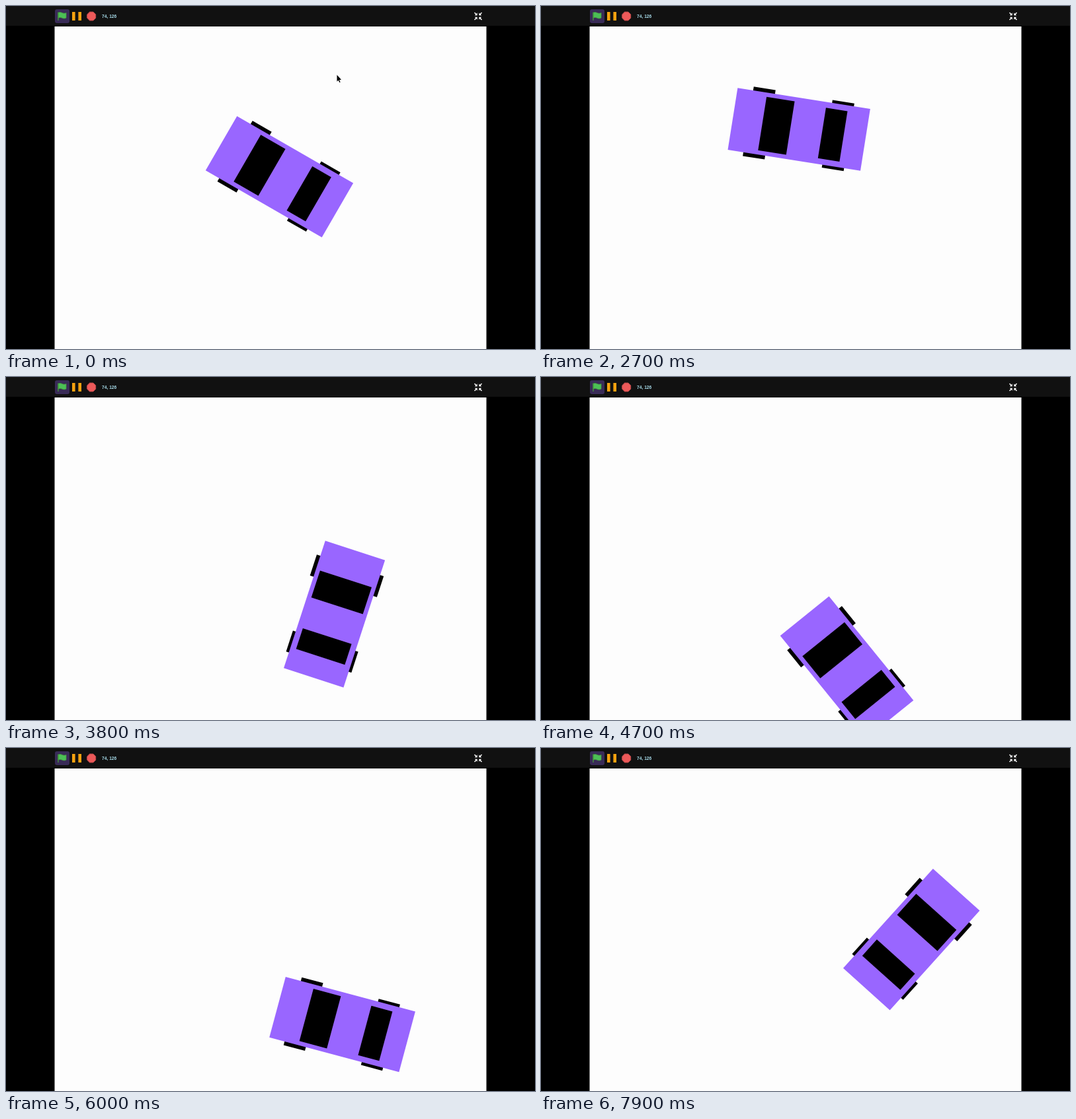
Write an HTML page with a canvas that moves like this. It is 800 px wide and 520 px high and loops after 8000 ms.

```html
<!DOCTYPE html>
<html lang="en">
<head>
<meta charset="utf-8">
<title>Driving car</title>
<style>
  html, body { margin: 0; width: 100%; height: 100%; overflow: hidden; background: #000; }
  canvas { display: block; width: 800px; height: 520px; }
</style>
</head>
<body>
<canvas id="view" width="800" height="520"></canvas>
<script>
const ctx = document.getElementById('view').getContext('2d');
const LOOP = 8000, STEP = 100;   // ms
const RAD = Math.PI / 180;
const STAGE = [73.5, 31, 653, 489];
const FORWARD = 1, REVERSE = -1;

// Where the steering or the gear changes.
const turns = [
  { at: 0, x: 413.5, y: 258.9, angle: 30, gear: FORWARD },
  { at: 4, x: 368, y: 216, angle: 51, gear: FORWARD },
  { at: 9, x: 291, y: 162.5, angle: 24, gear: FORWARD },
  { at: 22, x: 291, y: 162.5, angle: 24, gear: REVERSE },
  { at: 27, x: 390.2, y: 187, angle: 9, gear: REVERSE },
  { at: 38, x: 496.6, y: 359.5, angle: 108, gear: REVERSE },
  { at: 40.7, x: 483, y: 410, angle: 108, gear: REVERSE },
  { at: 44.5, x: 485, y: 488, angle: 73.5, gear: FORWARD },
  { at: 47, x: 462.5, y: 441.2, angle: 51, gear: FORWARD },
  { at: 52.4, x: 365, y: 391, angle: 9, gear: REVERSE },
  { at: 60, x: 508.6, y: 419.2, angle: 15, gear: FORWARD },
  { at: 64, x: 453, y: 404, angle: 15, gear: REVERSE },
  { at: 69.5, x: 540, y: 476, angle: 60, gear: FORWARD },
  { at: 79, x: 560.2, y: 290.2, angle: 132, gear: FORWARD }
];

// Cubic from p to q with end slopes m and n.
function hermite(p, q, m, n, u) {
  const v = 1 - u;
  return p * v * v * (1 + 2 * u) + q * u * u * (3 - 2 * u) + m * u * v * v - n * u * u * v;
}

// The car moves along its own axis, so its heading gives the slope of the path.
function poseAt(step) {
  const next = turns.findIndex(k => k.at > step);
  if (next < 0) return turns.at(-1);
  const a = turns[next - 1], b = turns[next];
  const u = (step - a.at) / (b.at - a.at);
  const bend = (b.angle - a.angle) * RAD;
  const pull = -a.gear * Math.hypot(b.x - a.x, b.y - a.y) / Math.cos(bend / 4) ** 2;
  const path = (axis, fn) =>
    hermite(a[axis], b[axis], pull * fn(a.angle * RAD), pull * fn(b.angle * RAD), u);
  return {
    x: path('x', Math.cos),
    y: path('y', Math.sin),
    angle: a.angle + (b.angle - a.angle) * u
  };
}

function poly(points, fill, stroke) {
  ctx.beginPath();
  points.forEach(([x, y]) => ctx.lineTo(x, y));
  ctx.closePath();
  ctx.fillStyle = fill;
  ctx.fill();
  if (stroke) {
    ctx.strokeStyle = stroke;
    ctx.lineWidth = 1;
    ctx.stroke();
  }
}

function box(x, y, w, h, fill) {
  ctx.fillStyle = fill;
  ctx.fillRect(x, y, w, h);
}

// A block across the car, centred on its long axis.
function block(x, length, width, fill) {
  box(x - length / 2, -width / 2, length, width, fill);
}

function drawCar({ x, y, angle }) {
  ctx.save();
  ctx.translate(x, y);
  ctx.rotate(angle * RAD);
  block(-61, 33.4, 106.4, '#000');
  block(59.8, 33.4, 103.8, '#000');
  block(0, 203, 95, '#9966ff');
  block(-34.7, 43, 82, '#000');
  block(51.6, 33, 77.5, '#000');
  ctx.restore();
}

function drawFlag() {
  ctx.beginPath();
  ctx.roundRect(74, 5, 22, 21, 3);
  ctx.fillStyle = '#392b57';
  ctx.fill();
  ctx.beginPath();
  ctx.moveTo(79, 10.2);
  ctx.bezierCurveTo(83, 7.5, 86, 13, 91, 10.4);
  ctx.lineTo(91, 18);
  ctx.bezierCurveTo(86, 21, 84, 15.5, 79, 18.2);
  ctx.closePath();
  ctx.fillStyle = '#4cbf56';
  ctx.fill();
  ctx.strokeStyle = '#45993d';
  ctx.lineWidth = 0.8;
  ctx.stroke();
  box(78.3, 9.5, 1.3, 12.5, '#45993d');
}

function drawStop() {
  const corners = Array.from({ length: 8 }, (_, i) => {
    const a = (i + 0.5) * Math.PI / 4;
    return [129.2 + 7 * Math.cos(a), 15.5 + 7 * Math.sin(a)];
  });
  poly(corners, '#ec5959', '#c24b4b');
}

function drawShrink() {
  for (const sx of [-1, 1]) for (const sy of [-1, 1]) {
    ctx.save();
    ctx.translate(714, 15.5);
    ctx.scale(sx, sy);
    poly([[1.3, 1.3], [5.2, 1.3], [1.3, 5.2]], '#fff');
    ctx.strokeStyle = '#fff';
    ctx.lineWidth = 1.5;
    ctx.beginPath();
    ctx.moveTo(2.5, 2.5);
    ctx.lineTo(5.5, 5.5);
    ctx.stroke();
    ctx.restore();
  }
}

function drawBar() {
  box(0, 0, 800, 30, '#111');
  drawFlag();
  for (const x of [100, 109.4]) box(x, 9, 4.6, 13, '#f5a20f');
  drawStop();
  ctx.font = 'bold 6.7px "Liberation Sans", Arial, sans-serif';
  ctx.fillStyle = '#a5d8e6';
  ctx.fillText('74, 126', 145, 18);
  drawShrink();
}

function drawPointer() {
  const outline = [[500.5, 104.5], [500.5, 114.5], [502.7, 112.4], [504.3, 116],
                   [505.6, 115.5], [504, 112], [507, 111.8]];
  poly(outline, '#000', '#fff');
  poly(outline, '#000');
}

function render(ms) {
  const step = Math.floor((ms % LOOP) / STEP);
  box(0, 0, 800, 520, '#000');
  box(...STAGE, '#fdfdfd');
  ctx.save();
  ctx.beginPath();
  ctx.rect(...STAGE);
  ctx.clip();
  drawCar(poseAt(step));
  ctx.restore();
  drawBar();
  if (step === 0) drawPointer();
}

let origin;
function tick(now) {
  origin ??= now;
  render(Math.max(0, now - origin));
  requestAnimationFrame(tick);
}
render(0);
requestAnimationFrame(tick);
</script>
</body>
</html>
```
